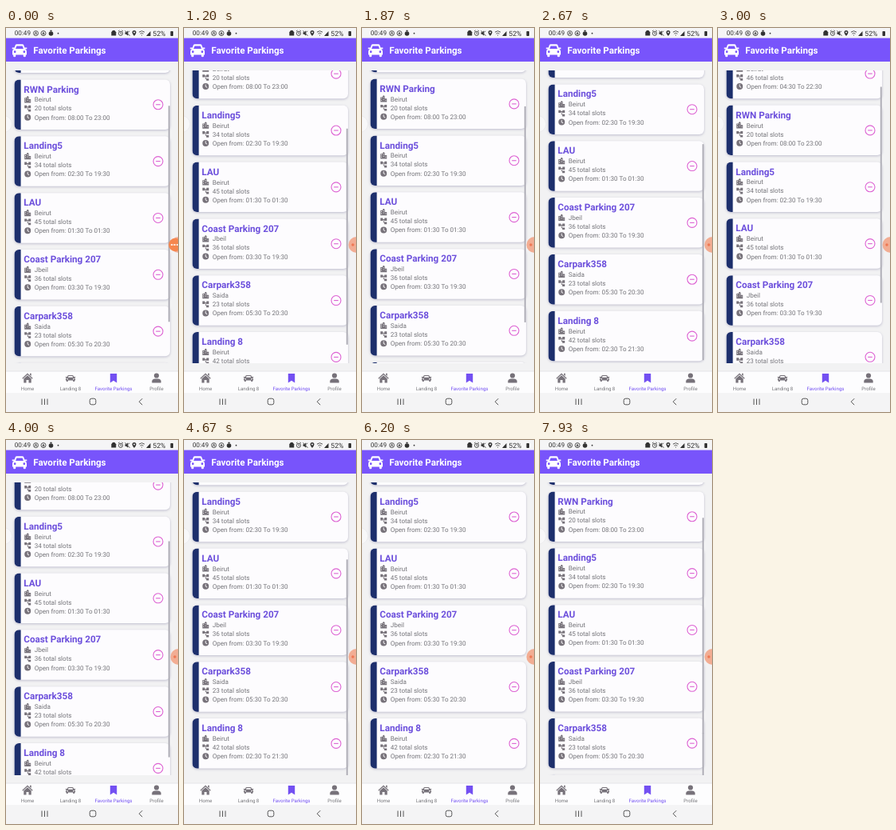
These frames come from a looping animation (216 px wide and 480 px high, 8 s). An HTML page:

```html
<!DOCTYPE html>
<html lang="en">
<head>
<meta charset="utf-8">
<title>Favorite Parkings</title>
<style>
html, body { margin: 0; width: 100%; height: 100%; overflow: hidden; background: #f2f2f3; }
svg { display: block; width: 216px; height: 480px; font-family: Roboto, sans-serif; text-rendering: geometricPrecision; }
.title { font-size: 11.7px; font-weight: 700; fill: #6c4fdc; }
.row { font-size: 8.05px; fill: #737378; }
.icon { fill: #77727a; }
.card { fill: #fdfcfe; filter: drop-shadow(0 1.5px 1.5px rgba(70, 65, 120, .3)); }
.minus { fill: none; stroke: #dd62d3; stroke-width: 1.1; }
.tab { font-size: 6.1px; text-anchor: middle; fill: #77777b; }
.tab.on { fill: #7350f2; }
.line { fill: none; stroke: #555; stroke-width: 1; }
</style>
</head>
<body>
<svg viewBox="0 0 216 480">
  <defs>
    <clipPath id="view"><rect y="53" width="216" height="366"/></clipPath>
    <clipPath id="edge"><rect width="8.2" height="63"/></clipPath>
    <path id="city" fill-rule="evenodd" d="M-4 4V-2.2H-1.4V-3.2L0-4.5 1.4-3.2V-.4H4V4ZM-3.2-1.2V-.3H-2.2V-1.2ZM-3.2 1.300V2.200H-2.200V1.300ZM-.5-2.200V-1.300H.5V-2.200ZM-.5.3V1.200H.5V.3ZM2.200 1.300V2.200H3.200V1.300Z"/>
    <path id="slots" d="M-4-3.7H-1V-2.3H1V-3.7H4V-.3H1V-1.4H.5V1.3H4V4H.8V2.1H-.4V-1.4H-1V-.3H-4Z"/>
    <path id="clock" fill-rule="evenodd" d="M-4 0A4 4 0 1 1 4 0 4 4 0 1 1-4 0M-.5-2.6V.3L1.7 1.7 2.2 1 .4-.1V-2.6Z"/>
    <path id="car" fill-rule="evenodd" d="M-6 .8Q-6-.8-4.7-1.3H-6.2V-2.3H-4.3L-3.6-4.1Q-3.3-5-2.3-5H2.3Q3.3-5 3.6-4.1L4.3-2.3H6.2V-1.3H4.7Q6-.8 6 .8V3.2H5.2V4.3Q5.200 5 4.200 5T3.200 4.300V3.200H-3.200V4.300Q-3.200 5-4.200 5T-5.200 4.300V3.200H-6ZM-3.300-1.400H3.300L2.400-3.700H-2.400ZM-4.800.9A.9.9 0 1 0-3 .9.9.9 0 1 0-4.800.9M3 .9A.9.9 0 1 0 4.800.9.9.9 0 1 0 3 .9"/>
  </defs>

  <rect width="216" height="480" fill="#f2f2f3"/>
  <circle cx="-3" cy="120" r="10.5" fill="#f8f8f9" stroke="#e9e9eb" stroke-width=".7"/>
  <g clip-path="url(#view)">
    <g id="list"></g>
    <g id="bar" fill="#b1b0b8">
      <rect id="thumb" x="203.8" y="53" width="2" height="270"/>
      <rect id="tail" x="203.8" y="366" width="2" height="53"/>
    </g>
  </g>

  <rect width="216" height="13" fill="#f5f5f6"/>
  <g fill="#333">
    <text x="10.8" y="9.4" font-size="8.1">00:49</text>
    <path d="M55.4 2.7H57.6V4H55.4ZM53.700 7A2.800 2.800 0 1 1 59.300 7 2.800 2.800 0 1 1 53.700 7"/>
    <circle cx="65.5" cy="6.7" r=".9"/>
    <path d="M132.300 9.500V5.200L134 3H136.500L138.200 5.200V9.500Z"/>
    <path d="M149.500 5.200H151L153.200 3.300V9.700L151 7.800H149.500Z"/>
    <path fill-rule="evenodd" d="M161 10Q158.500 7 158.500 5.500A2.500 2.500 0 0 1 163.500 5.500Q163.500 7 161 10M160 5.500A1 1 0 1 0 162 5.500 1 1 0 1 0 160 5.500"/>
    <path d="M176 10H181.500V4Z"/>
    <text x="184.300" y="9.500" font-size="8.700">52%</text>
    <rect x="206.500" y="4" width="3.500" height="6" rx=".8"/>
  </g>
  <g class="line">
    <circle cx="37.500" cy="6.600" r="3"/><path d="M36.200 8.400L37.500 4.800 38.800 8.400"/>
    <circle cx="47" cy="6.600" r="3"/><path d="M45.800 7.700L47 5.300 48.200 7.700Z"/>
    <circle cx="144" cy="6.800" r="2.600"/><path d="M144 5.300V7H145.300M141 4L142.500 2.900M147 4L145.500 2.900"/>
    <path d="M149.500 3.300L155.500 9.800M155 3.800L153.500 5.500"/>
    <path d="M167 5.200Q170.500 2.200 174 5.200M168.500 7.200Q170.500 5.400 172.500 7.200M170 9H171"/>
  </g>

  <rect y="12.600" width="216" height="29.400" fill="#7854fb"/>
  <use href="#car" transform="translate(17 28.300) scale(1.5 1.6)" fill="#fff"/>
  <text x="34.300" y="32.300" font-size="11.600" font-weight="700" fill="#fff">Favorite Parkings</text>

  <rect y="429" width="216" height="27.500" fill="#fdfdfe"/>
  <rect y="428.700" width="216" height=".7" fill="#dcdce0"/>
  <g class="icon">
    <path d="M20.300 437.800L27 431.500 33.700 437.800 32.900 438.700 27 433.200 21.100 438.700ZM22.300 438.500L27 434.200 31.700 438.500V443.500H28.500V440H25.500V443.500H22.300ZM30 431.800H31.700V435L30 433.500Z"/>
    <use href="#car" transform="translate(81 438) scale(1 .82)"/>
    <path d="M130.800 432H139.200V443.500L135 440.800 130.800 443.500Z" fill="#7350f2"/>
    <circle cx="189" cy="434.500" r="3.100"/>
    <path d="M183.300 443.500V441.500Q183.500 438.600 187 438.400H191Q194.500 438.600 194.700 441.500V443.500Z"/>
  </g>
  <g id="tabs"></g>

  <rect y="456.500" width="216" height="23.500" fill="#f4f4f5"/>
  <g class="line">
    <path d="M45 463.500V471M48.500 463.500V471M52 463.500V471"/>
    <rect x="105.200" y="463.200" width="7.600" height="7.600" rx="2.300"/>
    <path d="M171.200 463.200L167.200 467.200 171.200 471.200"/>
  </g>

  <circle cx="216.500" cy="271" r="10" fill="#f2ad93"/>
  <circle cx="212" cy="271" r="1.700" fill="#ee7752"/>
  <g id="hot">
    <circle cx="212.500" cy="271" r="8.300" fill="#f5874f"/>
    <path d="M207 271H209.500M210.500 271H213M214 271H216" stroke="#fff" stroke-width="1.300"/>
  </g>
</svg>
<script>
const LOOP = 8000, PITCH = 70.85, MAX = 130.6, RATIO = .738;
const $ = id => document.getElementById(id);

const lots = [
  ['Harbor Lot', 'Beirut', 46, '04:30 To 22:30'],
  ['RWN Parking', 'Beirut', 20, '08:00 To 23:00'],
  ['Landing5', 'Beirut', 34, '02:30 To 19:30'],
  ['LAU', 'Beirut', 45, '01:30 To 01:30'],
  ['Coast Parking 207', 'Jbeil', 36, '03:30 To 19:30'],
  ['Carpark358', 'Saida', 23, '05:30 To 20:30'],
  ['Landing 8', 'Beirut', 42, '02:30 To 21:30']
];

const row = (icon, y, text) =>
  `<use href="#${icon}" class="icon" x="27.2" y="${y - 3}"/><text class="row" x="35.8" y="${y}">${text}</text>`;

$('list').innerHTML = lots.map(([name, city, slots, hours], i) => `
  <g transform="translate(0 ${53.6 + i * PITCH})">
    <rect class="card" x="10.4" width="195.6" height="62.5" rx="6"/>
    <g transform="translate(10.4 0)" clip-path="url(#edge)">
      <rect width="30" height="62.5" rx="6" fill="#1d2f6c"/>
    </g>
    <text class="title" x="22.3" y="16.1">${name}</text>
    ${row('city', 28, city)}
    ${row('slots', 39, slots + ' total slots')}
    ${row('clock', 50.2, 'Open from: ' + hours)}
    <g class="minus"><circle cx="191" cy="31.3" r="6"/><path d="M188.2 31.3H193.8"/></g>
  </g>`).join('');

$('tabs').innerHTML = ['Home', 'Landing 8', 'Favorite Parkings', 'Profile'].map((name, i) =>
  `<text class="tab${i === 2 ? ' on' : ''}" x="${27 + i * 54}" y="452.6">${name}</text>`).join('');

// time, scroll offset, easing towards the next step
const scroll = [
  [0, 60], [1000, 60], [1200, 98.4, 'ease-out'], [1500, MAX], [1620, MAX, 'ease-in-out'],
  [2080, 10, 'ease-in-out'], [2540, MAX], [2620, MAX, 'ease-in'], [2670, 125.2],
  [3000, 28, 'ease-out'], [3280, 0], [3450, 0, 'ease-in'], [4000, 99.5, 'ease-out'],
  [4400, MAX], [7400, MAX, 'ease-out'], [7930, 60], [LOOP, 60]
];
const play = (id, steps, frame) => $(id).animate(
  steps.map(([t, v, easing = 'linear']) => ({ offset: t / LOOP, easing, ...frame(v) })),
  { duration: LOOP, iterations: Infinity });
const shift = k => v => ({ transform: `translateY(${v * k}px)` });
const fade = opacity => ({ opacity });

play('list', scroll, shift(-1));
play('thumb', scroll, shift(RATIO));
play('bar', [[0, 1], [70, 1], [470, 0], [1000, 0, 'step-end'], [1001, 1], [5000, 1],
  [5470, 0], [7400, 0, 'step-end'], [7401, 1], [LOOP, 1]], fade);
play('tail', [[0, 0, 'step-end'], [7400, 1], [LOOP, 1]], fade);
play('hot', [[0, 1], [70, 1], [470, 0], [LOOP, 0]], fade);
</script>
</body>
</html>
```
